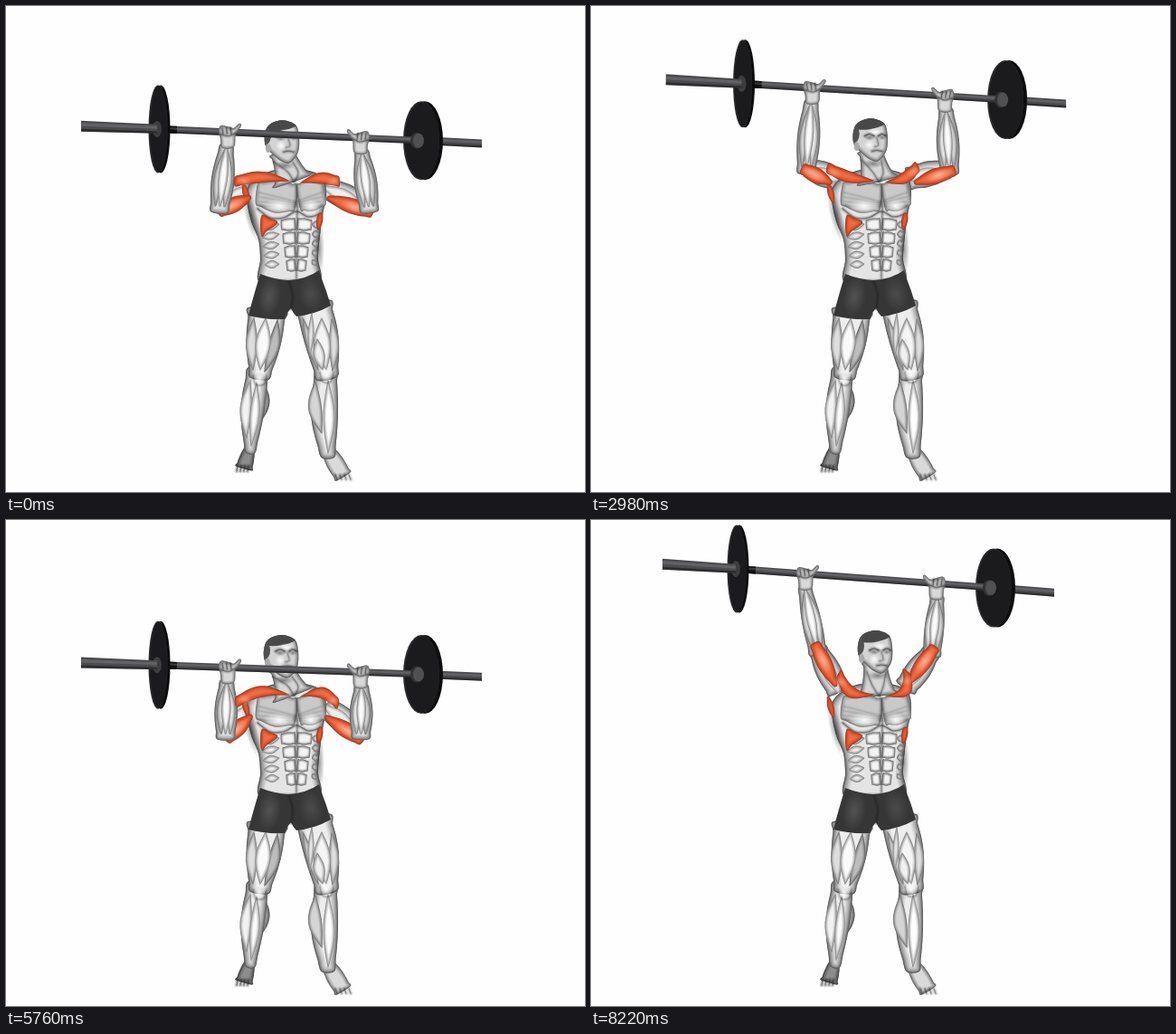
Write an HTML page with a canvas that moves like this. It is 640x537 px and loops after 8320 ms.

```html
<!DOCTYPE html>
<html lang="en">
<head>
<meta charset="utf-8">
<title>Barbell overhead press</title>
<style>
  html, body { margin: 0; width: 100%; height: 100%; overflow: hidden; background: #fefefe; }
  canvas { display: block; width: 100%; height: 100%; }
</style>
</head>
<body>
<canvas id="stage" width="640" height="537"></canvas>
<script>
const LOOP = 8320, TOP = 54, BOTTOM = 171;
const SKIN = '#ededed', RED = '#f26a40';
const stage = document.getElementById('stage').getContext('2d');
const bodyLayer = document.createElement('canvas');
bodyLayer.width = 640;
bodyLayer.height = 537;
let g = bodyLayer.getContext('2d');

const mix = (a, b, t) => a + (b - a) * t;
const between = (p, q, t) => [mix(p[0], q[0], t), mix(p[1], q[1], t)];
const clamp = v => Math.max(0, Math.min(1, v));
const range = n => Array.from({ length: n }, (_, i) => i);

// The picture changes in runs of even steps: first, last, count.
const runs = [[90, 920, 10], [1020, 1840, 10], [1920, 2700, 10], [2790, 3580, 9], [3680, 4480, 9],
  [4580, 4980, 5], [5180, 5920, 10], [6040, 6760, 7], [6880, 7620, 10], [7720, 8220, 6]];
const ticks = [0, ...runs.flatMap(([a, b, n]) =>
  range(n).map(i => Math.floor(mix(a, b, i / (n - 1)) / 10) * 10))];

// Bar height: up, down, up, each with a cosine ease; the loop cuts in mid-lift.
const ease = (time, from, to) => (1 - Math.cos(Math.PI * clamp((time - from) / (to - from)))) / 2;
const barHeight = time =>
  BOTTOM + (TOP - BOTTOM) * (ease(time, -1140, 1950) - ease(time, 1950, 4900) + ease(time, 5180, 8080));

// Parabola through three points at u = 0, 0.5 and 1.
const through = ([p, q, s], u) => [0, 1].map(k =>
  p[k] * (1 - u) * (1 - 2 * u) + q[k] * 4 * u * (1 - u) + s[k] * u * (2 * u - 1));

// Smooth curve through a flat list of coordinates.
function curve(flat, closed = true) {
  const n = flat.length / 2, path = new Path2D();
  const at = i => {
    const k = closed ? (i + n) % n : Math.max(0, Math.min(n - 1, i));
    return [flat[2 * k], flat[2 * k + 1]];
  };
  path.moveTo(...at(0));
  for (let i = 0; i < (closed ? n : n - 1); i++) {
    const [a, b, c, d] = [at(i - 1), at(i), at(i + 1), at(i + 2)];
    path.bezierCurveTo(b[0] + (c[0] - a[0]) / 6, b[1] + (c[1] - a[1]) / 6,
      c[0] - (d[0] - b[0]) / 6, c[1] - (d[1] - b[1]) / 6, c[0], c[1]);
  }
  if (closed) path.closePath();
  return path;
}

// Rounded form: flat fill darkened softly towards its rim.
function mass(flat, { fill = SKIN, depth = 16, rim = '#111', strength = 0.085 } = {}) {
  const path = curve(flat);
  g.save();
  g.fillStyle = fill;
  g.fill(path);
  g.clip(path);
  g.strokeStyle = rim;
  g.lineJoin = 'round';
  g.globalAlpha = strength;
  for (let w = depth; w > 1; w *= 0.78) {
    g.lineWidth = w;
    g.stroke(path);
  }
  g.restore();
}

function crease(flat, alpha = 0.4) {
  const path = curve(flat, false);
  g.save();
  g.strokeStyle = '#222';
  g.lineCap = 'round';
  for (const [w, a] of [[5, 0.15], [3, 0.25], [1.1, 0.7]]) {
    g.lineWidth = w;
    g.globalAlpha = alpha * a;
    g.stroke(path);
  }
  g.restore();
}

function glow(x, y, rx, ry, rgb, alpha, turn = 0) {
  g.save();
  g.translate(x, y);
  g.rotate(turn);
  g.scale(rx, ry);
  const fade = g.createRadialGradient(0, 0, 0, 0, 0, 1);
  fade.addColorStop(0, `rgba(${rgb},${alpha})`);
  fade.addColorStop(1, `rgba(${rgb},0)`);
  g.fillStyle = fade;
  g.fillRect(-1, -1, 2, 2);
  g.restore();
}
const shine = (x, y, rx, ry, turn) => glow(x, y, rx, ry, '255,255,255', 0.95, turn);
const shade = (x, y, rx, ry, turn) => glow(x, y, rx, ry, '30,30,30', 0.45, turn);

function disc(x, y, rx, ry, fill, turn = 0) {
  g.fillStyle = fill;
  g.beginPath();
  g.ellipse(x, y, rx, ry, turn, 0, 2 * Math.PI);
  g.fill();
}

// Point beside the middle of a-b; a positive offset lies right of the way from b to a.
function beside(a, b, t, offset) {
  const dx = b[0] - a[0], dy = b[1] - a[1], len = Math.hypot(dx, dy) || 1;
  const [x, y] = between(a, b, t);
  return [x - dy / len * offset, y + dx / len * offset];
}

// Tapered form from a to b: end half widths w0 and w1, a swelling and a sideways bow.
function limb(a, b, w0, swell, w1, look, bow = 0) {
  const side = sign => range(8).map(i => {
    const t = i / 7, s = Math.sin(Math.PI * t);
    return beside(a, b, t, bow * s + sign * (mix(w0, w1, t) + swell * s));
  });
  mass([...side(1), ...side(-1).reverse()].flat(), look);
}
const belly = (ax, ay, bx, by, w, bow = 0, fill = '#f2f2f2') =>
  limb([ax, ay], [bx, by], 0.5, w, 0.5, { fill, depth: 7, strength: 0.075 }, bow);
const redLook = { fill: RED, depth: 9, rim: '#641404', strength: 0.075 };

function drawLegs() {
  limb([270, 486], [263, 511], 5, 1, 9, { fill: '#8c8c8c', depth: 9 });
  limb([355, 490], [373, 520], 7, 2, 9, { fill: '#dadada', depth: 9 });
  for (const i of range(4)) {
    crease([256 + 4 * i, 508, 255 + 4 * i, 514], 0.8);
    crease([364 + 5 * i, 518, 366 + 5 * i, 523], 0.6);
  }
  // calves
  belly(283, 413, 279, 462, 8, -2, '#9c9c9c');
  limb([279, 400], [270, 494], 11, 5, 5, {}, 2);
  limb([354, 402], [356, 499], 11, 6, 7, {}, 3);
  belly(270, 414, 266, 477, 6, 3);
  belly(277, 416, 271, 486, 5, -1, '#fafafa');
  belly(342, 415, 349, 472, 7, 4, '#d5d5d5');
  belly(356, 414, 356, 494, 6, -1, '#fdfdfd');
  // thighs
  limb([289, 335], [280, 412], 20, 4, 10, {});
  limb([339, 328], [355, 412], 19, 4, 11, {}, -2);
  belly(300, 347, 286, 404, 6, -3, '#bdbdbd');
  belly(274, 345, 273, 402, 6, 2, '#dedede');
  belly(287, 345, 281, 402, 8, 0, '#fafafa');
  belly(328, 345, 345, 402, 4, 0, '#d8d8d8');
  belly(338, 340, 336, 386, 3, 0, '#fafafa');
  belly(360, 346, 361, 403, 5, -2, '#dedede');
  belly(349, 345, 354, 402, 9, 2, '#f5f5f5');
  belly(344, 368, 350, 402, 6, 1, '#f0f0f0');
  for (const [x, y] of [[280, 411], [354, 408]]) {
    shine(x, y, 8, 9);
    crease([x - 7, y - 3, x - 4, y + 7, x + 5, y + 7, x + 8, y - 3], 0.35);
  }
}

function drawTorso() {
  mass([278, 189, 266, 203, 267, 221, 272, 241, 279, 258, 281, 280, 280, 305, 314, 309, 347, 304,
    345, 279, 347, 254, 350, 231, 354, 209, 350, 190, 331, 181, 299, 181], { fill: '#e4e4e4' });
  shade(271, 232, 7, 30, -0.25);
  shade(346, 268, 6, 34);
  for (const [x, bow] of [[277, 1], [352, -1]]) {
    const look = { fill: '#c9c9c9', depth: 9, strength: 0.06 };
    limb([x, 207], [322 - bow, 212], 11, 6, 13, look, 1);
    for (const i of range(4)) crease([x + 3 * bow, 206 + 5 * i, 320, 216 + 2 * i], 0.16);
  }
  shine(302, 221, 17, 8, 0.05);
  shine(337, 221, 11, 8);
  crease([278, 224, 292, 234, 307, 234, 321, 227, 334, 233, 347, 230], 0.7);
  // flanks
  for (const i of range(5)) {
    belly(282 + i, 246 + 10 * i, 302, 241 + 11 * i, 4, 0, '#f0f0f0');
    belly(347 - i, 242 + 10 * i, 338, 241 + 11 * i, 3.5, 0, '#d8d8d8');
  }
  mass([283, 231, 291, 234, 300, 238, 297, 243, 288, 249, 283, 255, 281, 244], redLook);
  limb([348, 229], [345, 247], 2, 2, 1, redLook);
  limb([262, 195], [268, 218], 1, 2.5, 1, redLook);
  // abdomen
  for (const row of range(4)) {
    const y = 241 + 15 * row, reach = 17 - 2 * row;
    for (const dir of [-1, 1]) {
      limb([321 + dir, y], [321 + dir * reach, y + 1], 6, 1.5, 5, { fill: '#f3f3f3', depth: 6, strength: 0.1 });
    }
  }
  crease([321, 198, 322, 226, 321, 250, 321, 301], 0.55);
}

function drawShorts() {
  const path = new Path2D('M281 296Q296 302 312 303Q332 302 346 292Q350 305 354 315L359 331Q341 341 321 343Q317 339 315 334Q311 338 308 346Q286 347 268 342Q273 322 281 296Z');
  g.save();
  g.fillStyle = '#363636';
  g.fill(path);
  g.clip(path);
  glow(291, 321, 13, 23, '110,110,110', 0.5, 0.15);
  glow(337, 318, 14, 21, '100,100,100', 0.45, -0.2);
  g.restore();
  crease([313, 305, 317, 320, 315, 335], 0.7);
}

// The head draws back and the chin lifts as the bar comes down past the face.
function drawHead(u) {
  const back = clamp(2.3 * u), up = 4 * back;
  const dx = -6 * back - 4 * u, dy = 2 * back + 3 * u;
  limb([314 + dx, 156 + dy], [317, 194], 13, -2, 21, { fill: '#d6d6d6', depth: 10 });
  crease([305 + dx, 168 + dy, 311, 183, 318, 194], 0.5);
  crease([326 + dx, 168 + dy, 323, 184, 319, 194], 0.5);
  shade(317 + dx, 172 + dy, 12, 5);
  g.save();
  g.translate(dx, dy);
  const outline = [296, 151, 295, 138, 300, 127, 314, 122, 329, 127, 333, 140, 332, 157, 323, 169, 313, 167, 302, 158];
  mass(outline, { fill: '#d3d3d3', depth: 9 });
  g.save();
  g.clip(curve(outline));
  disc(312, 125 - up / 3, 24, 10, '#484848', -0.15);
  disc(296, 139, 6, 10, '#505050');
  g.restore();
  disc(299, 153, 3, 5, '#aaa');
  g.translate(0, -up);
  shine(319, 140, 9, 5);
  shine(313, 154, 6, 6);
  shade(313, 146, 6, 3);
  shade(327, 146, 4, 3);
  crease([308, 144, 313, 142, 318, 144], 0.9);
  crease([323, 144, 327, 142, 331, 144], 0.9);
  crease([321, 146, 323, 154, 319, 156], 0.4);
  crease([316, 161, 321, 160, 327, 161], 0.7);
  g.restore();
}

// Joint places at the top, halfway and at the bottom of the movement.
const arms = [
  { side: 1, handX: 246, drift: 8, chest: [312, 193], cap: [279, 188],
    shoulder: [[274, 190], [272, 195], [268, 206]],
    elbow: [[250, 142], [235, 199], [243, 237]],
    tip: [[274, 170], [256, 185], [254, 202]] },
  { side: -1, handX: 391, drift: 10, chest: [327, 195], cap: [351, 189],
    shoulder: [[347, 186], [351, 195], [353, 206]],
    elbow: [[377, 145], [402, 200], [392, 237]],
    tip: [[349, 167], [366, 184], [367, 204]] }
];

function poseArm(arm, u, near, barY) {
  const x = arm.handX - arm.drift * near;
  const hand = [x, barY(x) + 3.5];
  return { ...arm, hand, wrist: [x - 2 * arm.side, hand[1] + 10],
    shoulder: through(arm.shoulder, u), elbow: through(arm.elbow, u), tip: through(arm.tip, u) };
}

const drawUpperArm = ({ elbow, shoulder }) => {
  limb(elbow, shoulder, 9, 4, 11, { fill: '#dedede', depth: 12 });
  limb(between(elbow, shoulder, 0.15), shoulder, 1, 6, 2, { fill: '#eee', depth: 7, strength: 0.06 });
};

function drawForearm({ wrist, elbow, side }, near) {
  const end = between(wrist, elbow, 1.1);
  limb(wrist, end, 6.5, 5 - 2 * near, 9, { fill: '#dcdcdc', depth: 11 });
  for (const [offset, w, fill] of [[-5, 4, '#e4e4e4'], [5, 4, '#d2d2d2'], [0, 4, '#fafafa']]) {
    limb(between(wrist, end, 0.06), beside(wrist, end, 0.9, offset * side), 1.5, w, 1,
      { fill, depth: 6, strength: 0.08 }, offset * side * 0.5);
  }
}

// The triceps turns to the underside of the arm as the elbow drops.
function drawTriceps({ elbow, shoulder, side }, u) {
  const hang = 9 * clamp(2.2 * u) * side;
  const from = beside(elbow, shoulder, -0.12, hang * 0.5), to = beside(elbow, shoulder, 0.86, hang);
  limb(from, to, 5, 5, 2, redLook);
  const [x, y] = between(from, to, 0.4);
  glow(x, y, 16, 6, '255,205,185', 0.7, Math.atan2(to[1] - from[1], to[0] - from[0]));
}

// The deltoid runs from the arm over the shoulder cap to the collar bone.
function drawDeltoid({ tip, cap, chest, side }) {
  const dx = chest[0] - tip[0], dy = chest[1] - tip[1];
  const bow = ((cap[1] - tip[1]) * dx - (cap[0] - tip[0]) * dy) / Math.hypot(dx, dy);
  limb(tip, chest, 5, 3.5, 0.5, redLook, bow * 0.8);
  glow(mix(tip[0], cap[0], 0.4), mix(tip[1], cap[1], 0.4) + 2, 9, 6, '255,170,135', 0.6, side * 0.3);
}

function drawHand({ hand, side }) {
  g.save();
  g.translate(...hand);
  g.scale(side, 1);
  mass([-11, -5, -8, -11, 1, -9, 6, -8, 12, -13, 14, -10, 8, -1, 6, 13, -7, 14, -9, 4], { fill: '#d8d8d8', depth: 7 });
  for (const i of range(3)) crease([-7 + 4.5 * i, -8, -6 + 4.5 * i, -2], 0.75);
  crease([-9, -1, 0, 1, 7, -2], 0.6);
  g.restore();
}

function rod(x0, x1, yAt, w0, w1, color = '#4b4b4e') {
  const strip = (top, bottom, fill) => {
    g.fillStyle = fill;
    g.beginPath();
    g.moveTo(x0, yAt(x0) + w0 * top);
    g.lineTo(x1, yAt(x1) + w1 * top);
    g.lineTo(x1, yAt(x1) + w1 * bottom);
    g.lineTo(x0, yAt(x0) + w0 * bottom);
    g.fill();
  };
  strip(-0.5, 0.5, color);
  strip(-0.3, 0, 'rgba(150,150,155,.3)');
  strip(0.25, 0.5, 'rgba(0,0,0,.4)');
}

function plate(x, y, rx, ry, shift) {
  disc(x + shift, y, rx, ry, '#0d0d0e');
  disc(x, y, rx, ry, '#2c2c2f');
  disc(x + shift * 0.2, y, rx - 1, ry - 1.2, '#1b1b1d');
}

// Perspective: the bar levels out as it sinks and moves left when close to the top.
function poseBar(h, near) {
  const tilt = 21 - 0.1 * (h - TOP);
  const left = 83 - 4 * near, inner = 169 - 7 * near, outer = 461 - 14 * near, right = 526 - 14 * near;
  const yAt = x => h + tilt * (x < inner ? 0.25 * (x - inner) / (inner - left)
    : x < outer ? (x - inner) / (outer - inner) : 1 + 0.25 * (x - outer) / (right - outer));
  return { left, inner, outer, right, yAt };
}

function drawBar({ left, inner, outer, right, yAt }) {
  const y = yAt(outer);
  rod(outer + 12, right, yAt, 9, 9);
  plate(outer - 2, y, 20, 43.5, 4);
  rod(inner + 6, outer - 6, yAt, 8, 7.5);
  rod(inner + 12, inner + 20, yAt, 8, 8, '#111');
  disc(outer - 7, y, 7, 9, '#333336');
  disc(outer - 5, y, 6, 8, '#505054');
  plate(inner - 1, yAt(inner), 10.5, 48.5, 3);
  disc(inner - 2, yAt(inner), 5, 9, '#3d3d40');
  rod(left, inner - 2, yAt, 12, 10);
}

function draw(h) {
  const u = (h - TOP) / 107;
  const near = clamp((88 - h) / 34);
  const bar = poseBar(h, near);
  const posed = arms.map(arm => poseArm(arm, u, near, bar.yAt));
  g.fillStyle = '#fefefe';
  g.fillRect(0, 0, 640, 537);
  posed.forEach(drawUpperArm);
  g.drawImage(bodyLayer, 0, 0);
  drawHead(u);
  for (const arm of posed) {
    // The raised forearm lies behind the triceps, the lowered one in front.
    const parts = [() => drawForearm(arm, near), () => drawTriceps(arm, u)];
    if (u > 0.5) parts.reverse();
    parts.forEach(part => part());
    drawDeltoid(arm);
  }
  drawBar(bar);
  posed.forEach(drawHand);
}

drawLegs();
drawTorso();
drawShorts();
g = stage;

const start = performance.now();
let shown = -1;
function play() {
  const time = (performance.now() - start) % LOOP;
  const tick = ticks.findLast(t => t <= time);
  if (tick !== shown) {
    shown = tick;
    draw(barHeight(tick));
  }
  requestAnimationFrame(play);
}
play();
</script>
</body>
</html>
```
